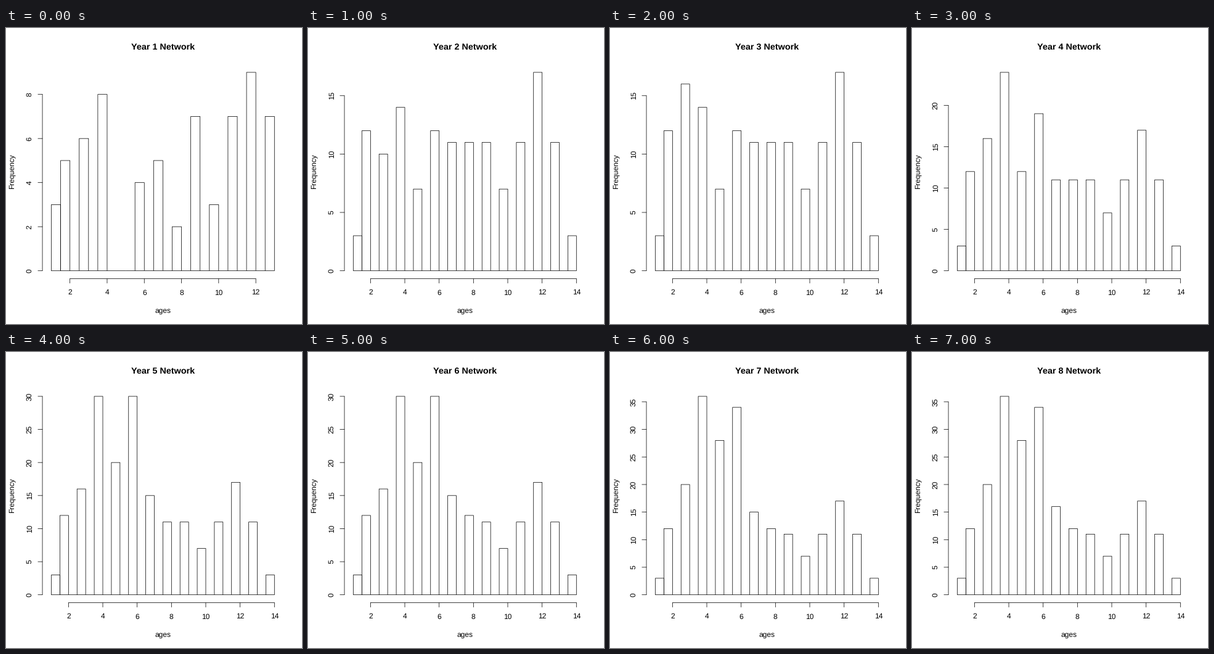
A matplotlib script that plays this animation: 480 by 480 pixels, repeating every 8000 ms.

```python
import matplotlib.pyplot as plt
from matplotlib.animation import FuncAnimation
from matplotlib.lines import Line2D
from matplotlib.patches import Rectangle

plt.rcParams["font.family"] = "Liberation Sans"
plt.rcParams["text.hinting"] = "none"

SIZE, DPI = 480, 72
LINE = 14.4                                       # margin line height in px
LEFT, RIGHT, TOP, BOTTOM = 59.04, 449.76, 59.04, 406.56
PAD = 0.04 / 1.08                                 # share of the plot left free at each end
X0 = LEFT + PAD * (RIGHT - LEFT)
X1 = RIGHT - PAD * (RIGHT - LEFT)
Y0 = BOTTOM - PAD * (BOTTOM - TOP)
Y1 = TOP + PAD * (BOTTOM - TOP)
MID_X, MID_Y = (LEFT + RIGHT) / 2, (TOP + BOTTOM) / 2
TICK = LINE / 2
STROKE = 0.75

# Number of members at each age (1, 2, 3, ...), year by year
YEARS = [
    [3, 5, 6, 8, 0, 4, 5, 2, 7, 3, 7, 9, 7],
    [3, 12, 10, 14, 7, 12, 11, 11, 11, 7, 11, 17, 11, 3],
]
CHANGES = [
    {3: 16},
    {4: 24, 5: 12, 6: 19},
    {4: 30, 5: 20, 6: 30, 7: 15},
    {8: 12},
    {3: 20, 4: 36, 5: 28, 6: 34},
    {7: 16},
]
for change in CHANGES:
    YEARS.append([change.get(age, n) for age, n in enumerate(YEARS[-1], 1)])

fig = plt.figure(figsize=(SIZE / DPI, SIZE / DPI), dpi=DPI, facecolor="white")
ax = fig.add_axes([0, 0, 1, 1])


def line(xs, ys):
    ax.add_line(Line2D(xs, ys, color="black", lw=STROKE, snap=False,
                       solid_capstyle="round"))


def label(x, y, text, size=12, **style):
    ax.text(x, y, text, fontsize=size, ha="center", va="baseline",
            color="black", **style)


def side_label(x, y, text):
    # Rotated text: its baseline is the right edge at x, centred on y
    ax.text(x, y, text, fontsize=12, rotation=90, rotation_mode="anchor",
            ha="center", va="baseline", color="black")


def draw_bars(counts, px, py):
    for i in range(2 * len(counts) - 2):
        start = 1 + i / 2
        if i == 0:
            n = counts[0]
        else:
            n = counts[i // 2 + 1] if i % 2 else 0
        ax.add_patch(Rectangle((px(start), py(n)), px(start + 0.5) - px(start),
                               Y0 - py(n), fill=False, ec="black", lw=STROKE,
                               joinstyle="round", snap=False))


def draw_axes(x_ticks, y_ticks, px, py):
    line([px(x_ticks[0]), px(x_ticks[-1])], [BOTTOM, BOTTOM])
    for v in x_ticks:
        line([px(v)] * 2, [BOTTOM, BOTTOM + TICK])
        label(px(v), BOTTOM + 1.8 * LINE, str(v))
    line([LEFT, LEFT], [py(y_ticks[0]), py(y_ticks[-1])])
    for v in y_ticks:
        line([LEFT, LEFT - TICK], [py(v)] * 2)
        side_label(LEFT - 1.2 * LINE, py(v), str(v))


def draw(frame):
    counts = YEARS[frame]
    oldest, peak = len(counts), max(counts)

    def px(age):
        return X0 + (X1 - X0) * (age - 1) / (oldest - 1)

    def py(n):
        return Y0 + (Y1 - Y0) * n / peak

    ax.clear()
    ax.set_axis_off()
    ax.set_xlim(0, SIZE)
    ax.set_ylim(SIZE, 0)
    step = 2 if peak < 10 else 5
    draw_bars(counts, px, py)
    draw_axes(range(2, oldest + 1, 2), range(0, peak + 1, step), px, py)
    label(MID_X, 34.7, f"Year {frame + 1} Network", 14.4, weight="bold")
    label(MID_X, BOTTOM + 3.8 * LINE, "ages")
    side_label(LEFT - 3.2 * LINE, MID_Y, "Frequency")
    return []


anim = FuncAnimation(fig, draw, frames=len(YEARS), init_func=lambda: [],
                     interval=1000, repeat=True, repeat_delay=0)
plt.show()
```
